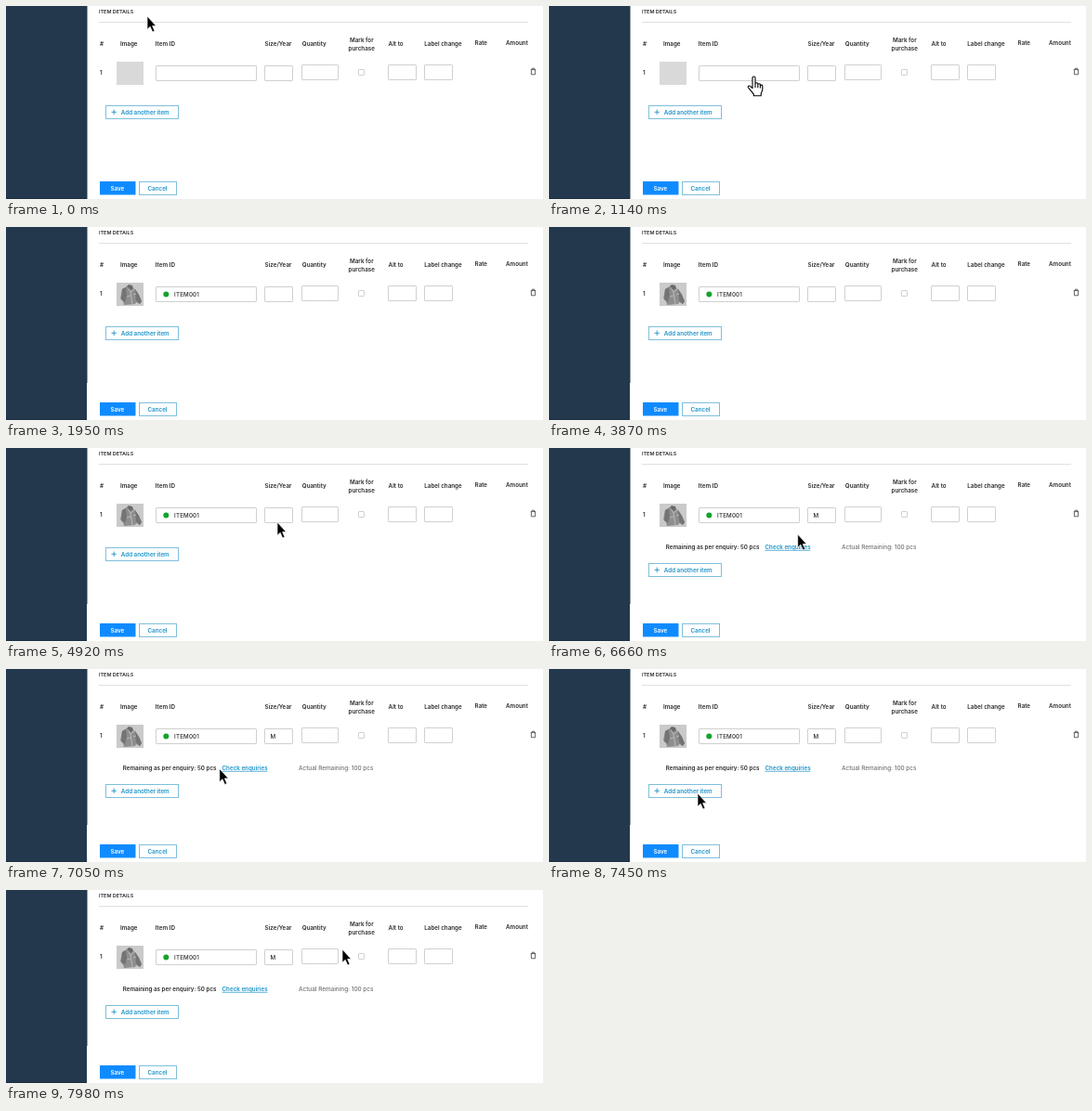
Write an HTML page that moves like this. It is 578 by 208 pixels and loops after 8 s.

```html
<!DOCTYPE html>
<html lang="en">
<head>
<meta charset="utf-8">
<title>Item details form</title>
<style>
  html, body { margin: 0; width: 100%; height: 100%; overflow: hidden; background: #fff; }
  svg { display: block; width: 578px; height: 208px; }
  text { font: 600 6.25px Inter, "Noto Sans", sans-serif; fill: #2b2b2b; }
  .title { font-size: 5.45px; }
  .value { font-size: 6.2px; font-weight: 500; letter-spacing: .2px; }
  .muted { font-size: 6.4px; font-weight: 500; fill: #737373; }
  .blue { fill: #1c93c8; }
  .white { fill: #fff; }
  .field { fill: #fff; stroke: #d0d0d0; }
  .button { fill: #fff; stroke: #7fbfdc; }
</style>
</head>
<body>
<svg viewBox="0 0 578 208">
  <rect width="578" height="208" fill="#fff"/>
  <rect width="87.5" height="208" fill="#23384d"/>
  <rect y="207" width="87" height="1" fill="#1b2c3f"/>
  <rect id="edge" x="87" y="168" width="1" height="40" fill="#fff"/>

  <text class="title" x="100" y="8">ITEM DETAILS</text>
  <path d="M100 17.5H562" stroke="#e0e0e0"/>
  <g id="heads"></g>
  <text x="101" y="73.9">1</text>
  <g id="fields"></g>

  <rect x="119" y="60" width="29" height="25" fill="#d9d9d9"/>
  <g id="photo">
    <rect x="119" y="60" width="29" height="25" fill="#cacaca"/>
    <path d="M125 67l5-3 5 1 4 2 4 6 3 7-2 3-4-2-1 2-12 1-1-4-3-3z" fill="#8e8e8e"/>
    <path d="M125 67l4-2 1 9-2 7-4-3zM139 67l4 6 3 7-2 3-4-4z" fill="#747474"/>
    <path d="M131 65l3 5 4-3M134 70l2 13M130 75l4-1M137 73l3-1" fill="none" stroke="#bababa"/>
    <path d="M130 64l2-2 4 1 1 3-3 2z" fill="#6a6a6a"/>
  </g>
  <g id="item">
    <circle cx="172.3" cy="72.5" r="3" fill="#14a32c"/>
    <text class="value" x="181" y="74.7">ITEM001</text>
  </g>
  <text id="size" class="value" x="284.5" y="74.7">M</text>

  <path d="M564.8 68.6h5.4M566.3 68.4v-1.2h2.4v1.2M565.4 68.8v5h4.2v-5"
        fill="none" stroke="#333" stroke-width=".75"/>

  <g id="stock">
    <text x="125.7" y="109">Remaining as per enquiry: 50 pcs</text>
    <text class="blue" x="232.5" y="109">Check enquiries</text>
    <path d="M232.5 110.3h49" stroke="#1c93c8" stroke-width=".7"/>
    <text class="muted" x="315" y="109">Actual Remaining: 100 pcs</text>
  </g>

  <g id="add">
    <rect class="button" x="107.5" y="107.5" width="78" height="14"/>
    <path d="M113.5 114.3h5.4M116.2 111.6v5.4" stroke="#1c93c8" stroke-width=".9"/>
    <text class="blue" x="123.8" y="116.5">Add another item</text>
  </g>

  <rect x="101" y="189" width="38.5" height="14.5" rx=".5" fill="#0f8bff"/>
  <text class="white" x="112.4" y="198.5">Save</text>
  <rect class="button" x="143.5" y="189.5" width="40" height="14"/>
  <text class="blue" x="152.5" y="198.5">Cancel</text>

  <path id="arrow" d="M0 0V14.2L3.2 11.3L5.7 17L8 16L5.6 10.5H9.6Z" stroke="#fff" stroke-width=".7"/>
  <path id="hand" d="M-1.5 13.2V2a1.5 1.5 0 0 1 3 0V8.6a1.4 1.4 0 0 1 2.8 0V9.5a1.3 1.3 0 0 1 2.6 .2V10.7a1.2 1.2 0 0 1 2.4 .3V14.6c0 2-1.6 3-1.6 5v1.7H-.2v-1.7C-1.5 17.6-4 14.8-6 12.5c-.9-1.3.8-2.7 2.1-1.6zM1.5 8.6v4M4.3 9.5v3.2M6.9 10.7v2.4"
        fill="#fff" stroke="#000" stroke-width="1.1" stroke-linejoin="round"/>
</svg>
<script>
const LOOP = 8000;
const $ = id => document.getElementById(id);

function make(parent, tag, attrs, text = "") {
  const el = document.createElementNS("http://www.w3.org/2000/svg", tag);
  for (const key in attrs) el.setAttribute(key, attrs[key]);
  el.textContent = text;
  parent.append(el);
}

const heads = [
  ["#", 101, 42.6], ["Image", 123, 42.6], ["Item ID", 160.8, 42.6],
  ["Size/Year", 278.6, 42.6], ["Quantity", 318.8, 42.6],
  ["Mark for", 370, 39.3], ["purchase", 368.6, 47.7],
  ["Alt to", 411.6, 42.6], ["Label change", 450.3, 42.6],
  ["Rate", 504.6, 41.8], ["Amount", 538, 41.8]
];
for (const [label, x, y] of heads) make($("heads"), "text", { x, y }, label);

const fields = [
  [161.5, 64.5, 108, 16], [278.5, 64.5, 30, 16], [318.5, 63.5, 39, 16],
  [379.5, 68.5, 6, 6], [411.5, 63.5, 30, 16], [450.5, 63.5, 30, 16]
];
for (const [x, y, width, height] of fields)
  make($("fields"), "rect", { class: "field", x, y, width, height, rx: .6 });

// Pointer moves: first and last step time, intervals, start, end, hide time, lead step
const moves = [
  { from: 740, to: 1140, n: 5, a: [152, 11], b: [220.5, 75.5], hide: 1290, lead: 1 },
  { from: 4460, to: 4920, n: 6, a: [221, 78], b: [292, 80], hide: 5320, lead: 0 },
  { from: 6660, to: 7450, n: 10, a: [267.7, 93], b: [160, 134], hide: 7520, lead: 0 },
  { from: 7520, to: 7980, n: 6, a: [160, 134], b: [362, 64], hide: LOOP, lead: 1 }
];

const ease = p => p * p * (3 - 2 * p);

function pointerAt(t) {
  if (t < moves[0].from) return moves[0].a;
  const m = moves.find(m => t >= m.from && t < m.hide);
  if (!m) return null;
  const step = Math.min(m.n, Math.floor((t - m.from) / (m.to - m.from) * m.n + .001));
  const p = ease((step + m.lead) / (m.n + m.lead));
  return m.a.map((v, i) => v + (m.b[i] - v) * p);
}

const show = (id, on) => $(id).setAttribute("visibility", on ? "visible" : "hidden");

function draw(t) {
  for (const id of ["edge", "photo", "item"]) show(id, t >= 1950);
  show("size", t >= 5320);
  const stock = t >= 5420;
  show("stock", stock);
  $("add").setAttribute("transform", `translate(0 ${stock ? 17 : 0})`);

  const pos = pointerAt(t);
  const overItem = pos && pos[0] > 161 && pos[0] < 270 && pos[1] > 64 && pos[1] < 81;
  show("arrow", pos && !overItem);
  show("hand", overItem);
  if (pos) $(overItem ? "hand" : "arrow").setAttribute("transform", `translate(${pos})`);
}

const start = performance.now();
function tick(now) {
  draw(Math.max(0, now - start) % LOOP);
  requestAnimationFrame(tick);
}
draw(0);
requestAnimationFrame(tick);
</script>
</body>
</html>
```
